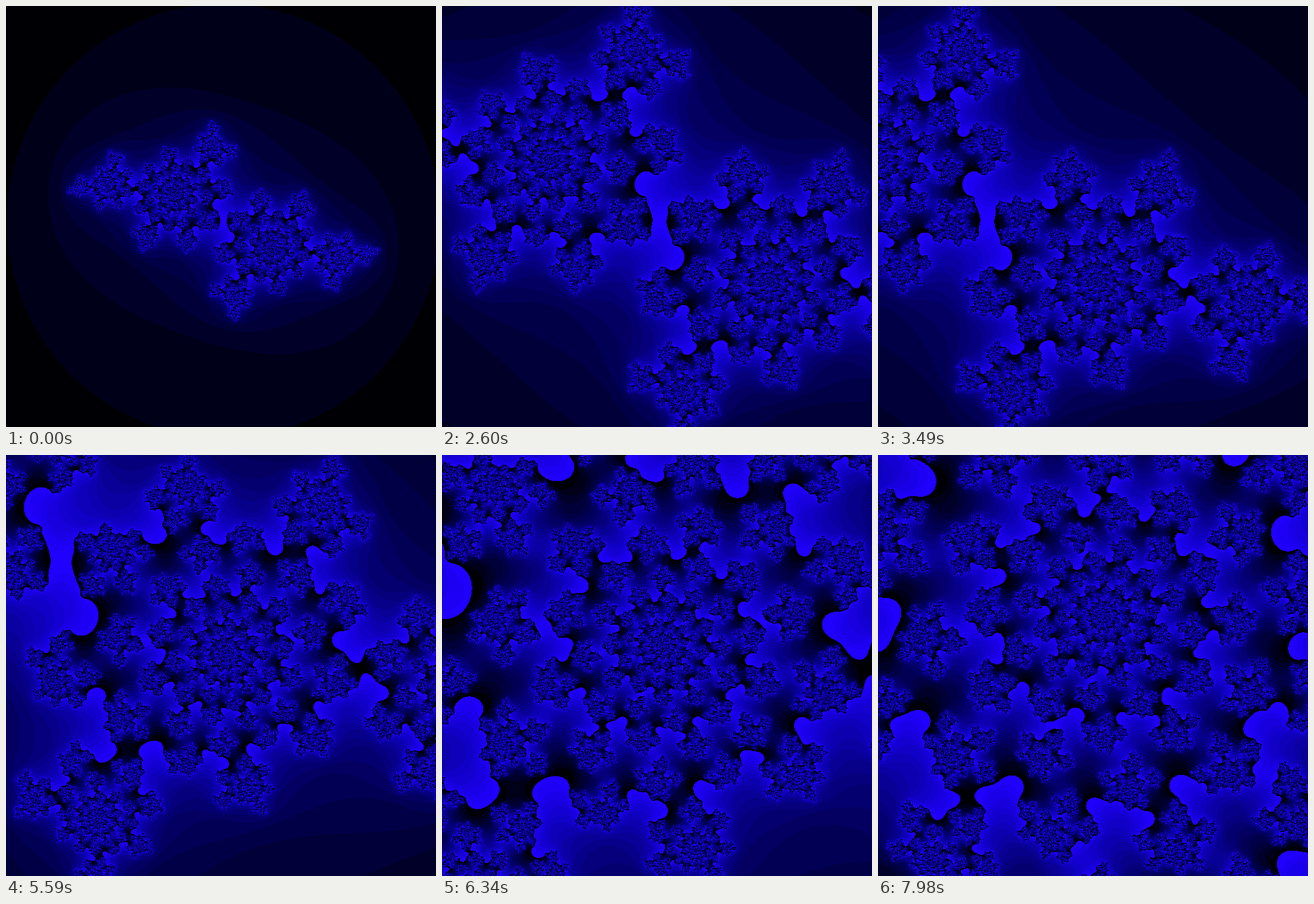
An HTML page with a canvas that plays this animation: 596 px wide and 583 px high, repeating every 8 s.

```html
<!DOCTYPE html>
<html lang="en">
<head>
<meta charset="utf-8">
<title>Julia set zoom</title>
<style>
  html, body { margin: 0; width: 100%; height: 100%; overflow: hidden; background: #000; }
  canvas { display: block; }
</style>
</head>
<body>
<canvas id="stage" width="596" height="583"></canvas>
<script>
const W = 596, H = 583, LOOP = 8000;
const ORIGIN_X = 301, ORIGIN_Y = 297;   // pixel that shows the view centre
const CR = -0.59, CI = -0.48;           // constant for an axis that points down
const MAX_ITER = 256, PERIOD = 20;      // brightness wraps every PERIOD iterations

const ctx = document.getElementById('stage').getContext('2d');

// Each step starts at `at` and either zooms in by half or pans by 150 pixels.
const steps = [
  { at: 0 },
  { at: 500, zoom: 1.5 },
  { at: 2600, zoom: 1.5 },
  { at: 3490, dx: 150 },
  { at: 4540, zoom: 1.5 },
  { at: 5590, dy: 150 },
  { at: 6340, zoom: 1.5 },
  { at: 7240, zoom: 1.5 },
  { at: 7980, zoom: 1.5 }
];

let scale = 150, cx = 0, cy = 0;
const views = steps.map(({ at, zoom = 1, dx = 0, dy = 0 }) => {
  cx += dx / scale;
  cy += dy / scale;
  scale *= zoom;
  return { at, cx, cy, scale };
});

// Packed ABGR colours, from near black to violet blue
const palette = Uint32Array.from({ length: PERIOD }, (_, i) => {
  const t = i / (PERIOD - 1);
  const blue = Math.round(4 + 251 * t ** 0.85);
  const red = Math.round(32 * t * t);
  return (255 << 24 | blue << 16 | red) >>> 0;
});

function escapeTime(x, y) {
  let n = 0, xx = x * x, yy = y * y;
  while (xx + yy <= 4 && n < MAX_ITER) {
    y = 2 * x * y + CI;
    x = xx - yy + CR;
    xx = x * x;
    yy = y * y;
    n++;
  }
  return n;
}

function render({ cx, cy, scale }) {
  const image = ctx.createImageData(W, H);
  const pixels = new Uint32Array(image.data.buffer);
  for (let py = 0, k = 0; py < H; py++) {
    const y = cy + (py - ORIGIN_Y) / scale;
    for (let px = 0; px < W; px++) {
      const n = escapeTime(cx + (px - ORIGIN_X) / scale, y);
      pixels[k++] = n < MAX_ITER ? palette[n % PERIOD] : palette[0];
    }
  }
  return image;
}

let shown;
function draw() {
  const t = performance.now() % LOOP;
  const view = views.findLast(v => v.at <= t);
  if (view !== shown) {
    view.image ||= render(view);
    ctx.putImageData(view.image, 0, 0);
    shown = view;
  }
  requestAnimationFrame(draw);
}
draw();
</script>
</body>
</html>
```
